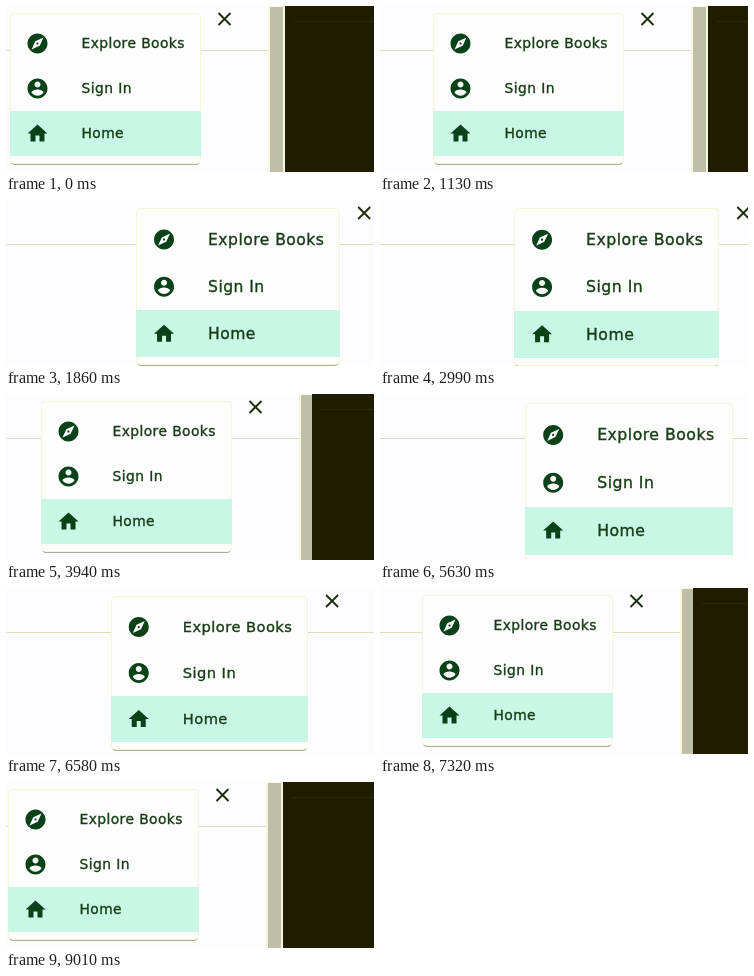
An HTML page for the animation above (9090 ms loop, 368 px wide and 166 px high).

```html
<!DOCTYPE html>
<html lang="en">
<head>
<meta charset="utf-8">
<title>Responsive menu</title>
<style>
  html, body { margin: 0; width: 100%; height: 100%; overflow: hidden; background: #fdfcfe; }
  svg { display: block; width: 368px; height: 166px; }
  text {
    font-family: "DejaVu Sans", Verdana, sans-serif; letter-spacing: .03em;
    fill: #173d16; stroke: #173d16; stroke-width: .35px;
  }
  .icon { fill: #0a4218; }
</style>
</head>
<body>
<svg viewBox="0 0 368 166">
  <rect width="368" height="166" fill="#fdfcfe"/>
  <rect id="rule" y="44" height="1" fill="#dfddb4"/>
  <path id="close" d="M-6-6L6 6M6-6L-6 6" stroke="#1c2e0c" stroke-width="1.9" fill="none"/>
  <g id="bar">
    <rect x="-17" width="17" height="166" fill="#f8f7dc"/>
    <rect x="-15" y="1" width="13" height="165" fill="#bfbea8"/>
  </g>
  <g id="menu">
    <rect id="shade" rx="4" fill="#93937f"/>
    <rect id="card" rx="4" fill="#fdfdfd" stroke="#f7f6d2"/>
    <rect id="active" fill="#c8f7e6"/>
  </g>
  <g id="dark">
    <rect width="368" height="166" fill="#1f1c00"/>
    <rect x="9" y="15" width="368" height="1" fill="#2c2800"/>
  </g>
</svg>
<script>
const LOOP = 9090, LAG = 40;
const $ = id => document.getElementById(id);

// [time, left edge of the menu]
const KEYS = [
  [0, 4], [130, 4], [500, 12], [1000, 42], [1860, 130], [2400, 172],
  [2990, 134], [3730, 58], [3940, 35], [4300, 4], [4460, 4], [4640, 20],
  [5630, 145], [5960, 166], [6450, 117], [7320, 42], [7360, 38],
  [7700, 10], [8100, 2], [9090, 2]
];
const ITEMS = [
  ["Explore Books", "M12 10.9c-.61 0-1.1.49-1.1 1.1s.49 1.1 1.1 1.1 1.1-.49 1.1-1.1-.49-1.1-1.1-1.1zM12 2C6.48 2 2 6.48 2 12s4.48 10 10 10 10-4.48 10-10S17.52 2 12 2zm2.19 12.19L6 18l3.81-8.19L18 6l-3.81 8.19z"],
  ["Sign In", "M12 2C6.48 2 2 6.48 2 12s4.48 10 10 10 10-4.48 10-10S17.52 2 12 2zm0 3c1.66 0 3 1.34 3 3s-1.34 3-3 3-3-1.34-3-3 1.34-3 3-3zm0 14.2c-2.5 0-4.71-1.28-6-3.22.03-1.99 4-3.08 6-3.08 1.99 0 5.97 1.09 6 3.08-1.29 1.94-3.5 3.22-6 3.22z"],
  ["Home", "M10 20v-6h4v6h5v-8h3L12 3 2 12h3v8z"]
];

function add(tag, attrs) {
  const el = document.createElementNS("http://www.w3.org/2000/svg", tag);
  set(el, attrs);
  return $("menu").appendChild(el);
}
function set(el, attrs) {
  for (const name in attrs) el.setAttribute(name, attrs[name]);
}

const rows = ITEMS.map(([label, d]) => {
  const icon = add("path", { d, class: "icon", "fill-rule": "evenodd" });
  const text = add("text", {});
  text.textContent = label;
  return { icon, text };
});

// Monotone cubic through the keys
const slope = i => (KEYS[i + 1][1] - KEYS[i][1]) / (KEYS[i + 1][0] - KEYS[i][0]);
const tangents = KEYS.map((k, i) => {
  if (i === 0 || i === KEYS.length - 1) return 0;
  const a = slope(i - 1), b = slope(i);
  return a * b <= 0 ? 0 : 2 * a * b / (a + b);
});
function leftAt(t) {
  t = Math.min(t, LOOP);
  let i = 0;
  while (i < KEYS.length - 2 && t >= KEYS[i + 1][0]) i++;
  const [t0, a] = KEYS[i], [t1, b] = KEYS[i + 1];
  const h = t1 - t0, u = (t - t0) / h, v = 1 - u;
  return a * (1 + 2 * u) * v * v + b * u * u * (3 - 2 * u)
    + h * u * v * (tangents[i] * v - tangents[i + 1] * u);
}

const growth = left => Math.max(0, Math.min(1.15, (left - 82) / 63));
const pageWidth = left => Math.round(left + 275 + 18 * growth(left));

function draw(t) {
  const left = Math.round(leftAt(t)), q = growth(left);
  const page = pageWidth(left);
  // The window edge runs ahead of the layout while it shrinks
  const edge = Math.min(page, pageWidth(leftAt(t + LAG)));
  const top = Math.round(7 + 1.8 * q), row = 45 + 2.8 * q;
  const width = Math.round(191 + 17 * q), height = Math.round(3 * row + 16);
  const size = Math.min(103 + 17 * q, 117) * .1345;

  set($("rule"), { width: Math.max(0, page - 17) });
  set($("close"), { transform: `translate(${left + 214.5 + 18 * q} 13)` });
  set($("bar"), { transform: `translate(${page} 0)` });
  set($("dark"), { transform: `translate(${edge} 0)` });
  set($("menu"), { transform: `translate(${left} ${top})` });
  set($("shade"), { x: 1, y: height - 12, width: width - 2, height: 12.8 });
  set($("card"), { x: .5, y: .5, width: width - 1, height: height - 1 });
  set($("active"), { y: Math.round(8 + 2 * row), width, height: Math.round(row) });
  rows.forEach(({ icon, text }, i) => {
    const mid = 8 + row * (i + .5);
    set(icon, { transform: `translate(${15.5 + .7 * q} ${mid - 12})` });
    set(text, { x: 71.5 + .7 * q, y: Math.round(mid + size * .35), "font-size": size });
  });
}

const start = performance.now();
function tick() {
  draw((performance.now() - start) % LOOP);
  requestAnimationFrame(tick);
}
tick();
</script>
</body>
</html>
```
